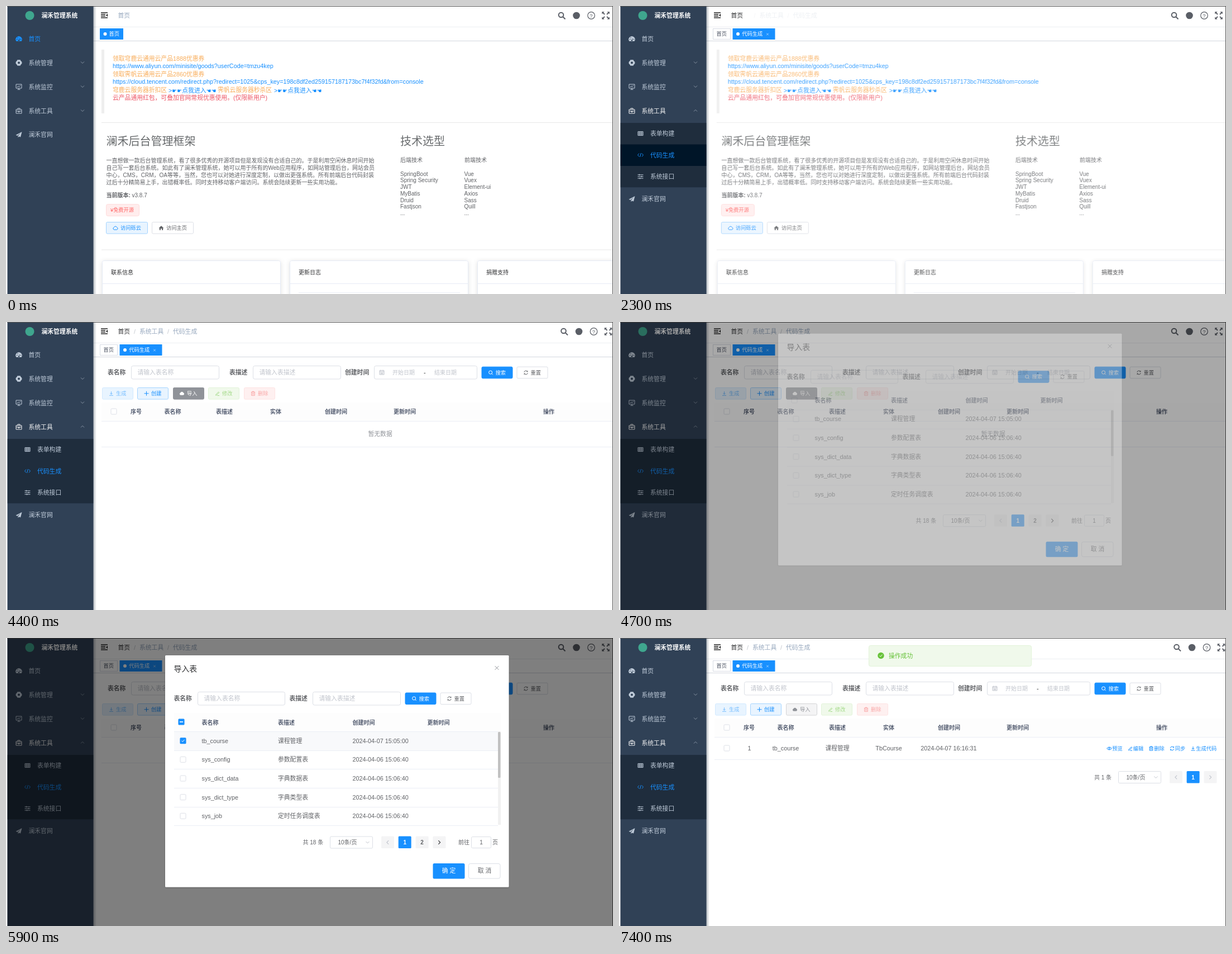
An HTML page for the animation above (8 s loop, 1087x515 px).

```html
<!DOCTYPE html>
<html lang="zh-CN">
<head>
<meta charset="utf-8">
<title>管理系统</title>
<style>
html, body { margin: 0; width: 100%; height: 100%; overflow: hidden; background: #fff; }
svg { display: block; width: 100vw; height: 100vh; }
text { font-family: 'Liberation Sans', 'Noto Sans CJK SC', 'Noto Sans CJK', 'DejaVu Sans', sans-serif; white-space: pre; }
</style>
</head>
<body>
<svg id="stage" viewBox="0 0 1087 515" xmlns="http://www.w3.org/2000/svg"></svg>
<script>
const BLUE = '#1890ff', GREY = '#606266', PALE = '#c0c4cc', LINE = '#dcdfe6', INK = '#303133', HEAD = '#515a6e';
const LOOP = 8000, STEP = 100;
const SIDE = 2.5; // left edge of the sidebar

// ---- drawing helpers (y is the vertical centre of a text) ----
const T = (x, y, s, size = 10.8, fill = GREY, extra = '') =>
  `<text x="${x}" y="${(y + size * 0.37).toFixed(2)}" font-size="${size}" fill="${fill}" ${extra}>${s}</text>`;
const BOLD = 'font-weight="700"', MID = 'text-anchor="middle"';
const R = (x, y, w, h, fill, extra = '') =>
  `<rect x="${x}" y="${y}" width="${w}" height="${h}" fill="${fill}" ${extra}/>`;
const box = (x, y, w, h, fill, stroke, rx = 2, extra = '') =>
  R(x + .5, y + .5, w - 1, h - 1, fill, `stroke="${stroke}" rx="${rx}" ${extra}`);
const H = (x1, x2, y, c = '#ebeef5') => R(x1, y, x2 - x1, 1, c);
const G = (id, body, extra = '') => `<g id="${id}" ${extra}>${body}</g>`;
const icon = (name, x, y, c = 'currentColor', k = 1) =>
  `<path transform="translate(${x} ${y}) scale(${k})" d="${ICONS[name]}" fill="none" stroke="${c}" stroke-width="1"/>`;
const solid = (name, x, y, c = 'currentColor') =>
  `<path transform="translate(${x} ${y})" d="${ICONS[name]}" fill="${c}" fill-rule="evenodd"/>`;

const ICONS = {
  gauge: 'M-4.6 4A5.6 5.6 0 1 1 4.6 4ZM-.9 2.4A1.3 1.3 0 1 0 .9 2.4L1.8-2ZM-4 0h1.4v1.2H-4ZM2.8 0h1.4v1.2H2.8ZM-2.6-2.9h1.2v1.2h-1.2Z',
  gear: 'M-2.6-5.2H2.6L3.4-3.6 5.4-1.4V1.4L3.4 3.6 2.6 5.2H-2.6L-3.4 3.6-5.4 1.4V-1.4L-3.4-3.6ZM-2 0A2 2 0 1 0 2 0A2 2 0 1 0-2 0Z',
  monitor: 'M-5-4.5H5V2.5H-5ZM-2.5 4.8H2.5M0 2.5V4.8M-3 .5L-1-1.5 .5 0 3-2.8',
  bag: 'M-5-2.5H5V4.5H-5ZM-2-2.5V-4.5H2V-2.5M-5 .5H5M-1 .5V2H1V.5',
  plane: 'M5.5-5L-5.5 .8-2.6 2 3-3-1.5 2.6V5.2L.2 3.3 3 4.5Z',
  table: 'M-4.5-3.5H4.5V3.5H-4.5ZM-4.5-1.2H4.5M-4.5 1.2H4.5M-1.5-3.5V3.5M1.5-3.5V3.5',
  code: 'M-2.5-2.8L-5 0-2.5 2.8M2.5-2.8L5 0 2.5 2.8M.9-3.4L-.9 3.4',
  sliders: 'M-5-3.2H5M-5 0H5M-5 3.2H5M-2-4.4V-2M2-1.2V1.2M-1 2V4.4',
  chevron: 'M-3-1.5L0 1.5 3-1.5',
  left: 'M1.5-3L-1.5 0 1.5 3',
  right: 'M-1.5-3L1.5 0-1.5 3',
  search: 'M-3.4-.4A3 3 0 1 0 2.6-.4A3 3 0 1 0-3.4-.4M1.8 1.8L3.8 3.8',
  refresh: 'M-3.2-.8A3.3 3.3 0 0 1 2.8-1.8M3-3.4V-1.6H1.2M3.2 .8A3.3 3.3 0 0 1-2.8 1.8M-3 3.4V1.6H-1.2',
  down: 'M0-3.5V1.5M-2-.5L0 1.5 2-.5M-3.5 3.5H3.5',
  plus: 'M-4 0H4M0-4V4',
  pen: 'M-2.6 1.8L2-2.8 3.2-1.6-1.4 3-3 3.2ZM-.2 3.7H3.6',
  bin: 'M-3.6-2.4H3.6M-1.4-2.4V-3.6H1.4V-2.4M-2.8-2.4V3.6H2.8V-2.4M-.9-.8V2M.9-.8V2',
  eye: 'M-4.4 0Q0-5 4.4 0Q0 5-4.4 0ZM-1.3 0A1.3 1.3 0 1 0 1.3 0A1.3 1.3 0 1 0-1.3 0',
  calendar: 'M-4-3.2H4V4H-4ZM-4-1H4M-2-4.4V-2.2M2-4.4V-2.2M-2.4 1H2.4M-2.4 2.6H2.4',
  cloud: 'M-2.4 3A2.2 2.2 0 0 1-2.6-1.2A2.8 2.8 0 0 1 2.6-1.2A2.2 2.2 0 0 1 2.4 3Z',
  house: 'M-4.5 .2L0-4 4.5 .2H3.2V3.8H1V1H-1V3.8H-3.2V.2Z',
  cross: 'M-3.4-3.4L3.4 3.4M3.4-3.4L-3.4 3.4',
  tick: 'M-2.5 0L-.7 1.9 2.6-1.9',
};

const check = (x, y) => box(x - 5.5, y - 5.5, 11, 11, '#fff', LINE, 1.5);
const field = (x, y, w, hint) => box(x, y, w, 24.5, '#fff', LINE, 3) + T(x + 11.5, y + 12, hint, 10.8, PALE);
const button = (x, y, w, name, label, bg, line, c) =>
  box(x, y, w, 21.6, bg, line) + icon(name, x + 16.5, y + 10.8, c) + T(x + 25, y + 10.8, label, 9.24, c);
const searchPair = (x, y) =>
  button(x, y, 56, 'search', '搜索', BLUE, BLUE, '#fff') +
  button(x + 63, y, 56, 'refresh', '重置', '#fff', LINE, GREY);
const pageBtn = (x, y, body, bg = '#f4f4f5') => R(x, y, 23, 21.6, bg, 'rx="1.5"') + body;
const pageNum = (x, y, n, on) =>
  pageBtn(x, y, T(x + 11.5, y + 11, n, 10, on ? '#fff' : GREY, BOLD + ' ' + MID), on ? BLUE : '#f4f4f5');
const pageArrow = (x, y, name, c) => pageBtn(x, y, icon(name, x + 11.5, y + 11, c, 1.1));
const pager = (x, y, total, w) =>
  T(x, y, total, 10) + box(x + w, y - 11, 77, 22, '#fff', LINE) +
  T(x + w + 14.5, y, '10条/页', 10) + icon('chevron', x + w + 67.5, y, PALE);

// ---- home page ----
function home() {
  const orange = '#f8ac59';
  const link = x => T(x, 151, '>', 10.8, BLUE) + T(x + 6.3, 151, '☛☛', 10, BLUE) +
    T(x + 24.3, 151, '点我进入', 10.8, BLUE) + T(x + 67.6, 151, '☚☚', 10, BLUE);
  const lines = (x, y, gap, list) => list.map((s, i) => T(x, y + i * gap, s, 10)).join('');
  const card = (x, title) => box(x, 455, 320, 90, '#fff', '#e6ebf5', 3, 'filter="url(#soft)"') +
    T(x + 16, 476, title, 10, INK) + H(x, x + 320, 496, '#e6ebf5');
  return R(171, 78, 5, 114, '#eee') +
    T(191, 94, '领取穹鹿云通用云产品1888优惠券', 10.8, orange) +
    T(191, 107, 'https://www.aliyun.com/minisite/goods?userCode=tmzu4kep', 10.8, BLUE) +
    T(191, 121.5, '领取霁帆云通用云产品2860优惠券', 10.8, orange) +
    T(191, 135, 'https://cloud.tencent.com/redirect.php?redirect=1025&amp;cps_key=198c8df2ed259157187173bc7f4f32fd&amp;from=console', 10.8, BLUE) +
    T(191, 150, '穹鹿云服务器折扣区', 10.8, orange) + link(291) +
    T(379, 150, '霁帆云服务器秒杀区', 10.8, orange) + link(480) +
    T(191, 164, '云产品通用红包，可叠加官网常规优惠使用。(仅限新用户)', 10.8, '#ed5565') +
    H(171, 1087, 208, '#e8e8e8') +
    T(179.5, 242, '澜禾后台管理框架', 20, '#676a6c', 'font-weight="300"') +
    T(706, 242, '技术选型', 20, '#676a6c', 'font-weight="300"') +
    lines(179.5, 276.5, 13, [
      '一直想做一款后台管理系统，看了很多优秀的开源项目但是发现没有合适自己的。于是利用空闲休息时间开始',
      '自己写一套后台系统。如此有了澜禾管理系统，她可以用于所有的Web应用程序，如网站管理后台，网站会员',
      '中心，CMS，CRM，OA等等，当然，您也可以对她进行深度定制，以做出更强系统。所有前端后台代码封装',
      '过后十分精简易上手，出错概率低。同时支持移动客户端访问。系统会陆续更新一些实用功能。']) +
    T(179.5, 338, '当前版本:', 10, GREY, BOLD) + T(225.5, 338, 'v3.8.7', 10) +
    box(179, 354, 60, 22, '#ffeded', '#ffdbdb', 3) + T(187, 365, '¥免费开源', 9.24, '#ff6464') +
    box(179, 386, 75, 21.6, '#e8f4ff', '#a3d3ff') + icon('cloud', 196, 397, BLUE) + T(205, 397, '访问砾云', 9.24, BLUE) +
    box(261, 386, 75, 21.6, '#fff', LINE) + solid('house', 278, 397, GREY) + T(287, 397, '访问主页', 9.24) +
    T(706, 275, '后端技术', 10) + T(821, 275, '前端技术', 10) +
    lines(706, 300, 11.75, ['SpringBoot', 'Spring Security', 'JWT', 'MyBatis', 'Druid', 'Fastjson', '...']) +
    lines(820.5, 300, 11.75, ['Vue', 'Vuex', 'Element-ui', 'Axios', 'Sass', 'Quill', '...']) +
    H(171, 1087, 435.5, '#e8e8e8') +
    card(172, '联系信息') + card(508, '更新日志') + card(844, '捐赠支持') + H(524, 813, 512);
}

// ---- generator page ----
function generator() {
  const heads = [[223, '序号'], [283.5, '表名称'], [376, '表描述'], [473, '实体'], [571, '创建时间'], [694, '更新时间'], [962, '操作']];
  const ops = [[878, 'eye', '预览'], [915.5, 'pen', '编辑'], [953, 'bin', '删除'], [990.5, 'refresh', '同步'], [1028, 'down', '生成代码']];
  const importBtn = (bg, line, c) => box(299, 117, 56, 21.6, bg, line) + solid('cloud', 315, 127.8, c) + T(324, 127.8, '导入', 9.24, c);
  return T(182, 90, '表名称', 10.8, GREY, BOLD) + field(224, 78, 158, '请输入表名称') +
    T(400, 90, '表描述', 10.8, GREY, BOLD) + field(442, 78, 158, '请输入表描述') +
    T(607, 90, '创建时间', 10.8, GREY, BOLD) + box(659, 78, 185, 24.5, '#fff', LINE, 3) +
    icon('calendar', 673, 90, PALE) + T(692, 90, '开始日期', 10, PALE) + T(748, 90, '-', 10.8, INK) + T(767, 90, '结束日期', 10, PALE) +
    searchPair(851.5, 79.7) +
    button(172, 117, 56, 'down', '生成', '#e8f4ff', '#d1e9ff', '#74bcff') +
    button(235, 117, 56, 'plus', '创建', '#e8f4ff', '#a3d3ff', BLUE) +
    importBtn('#f4f4f5', '#d3d4d6', '#909399') + G('importHover', importBtn('#909399', '#909399', '#fff')) +
    button(362, 117, 56, 'pen', '修改', '#f0f9eb', '#e1f3d8', '#a4da89') +
    button(426, 117, 56, 'bin', '删除', '#fef0f0', '#fde2e2', '#f9a7a7') +
    R(171, 144, 916, 34, '#fdfdfd') + H(171, 1087, 177) + check(193, 160) +
    heads.map(([x, s]) => T(x, 160.5, s, 10, HEAD, BOLD)).join('') +
    G('empty', T(648.5, 200, '暂无数据', 10.8, '#909399') + H(171, 1087, 223)) +
    G('result', check(193, 197) + T(233.5, 197, '1', 10.8, GREY, MID) +
      T(298.5, 197, 'tb_course', 10.8, GREY, MID) + T(391, 197, '课程管理', 10.8, GREY, MID) +
      T(483, 197, 'TbCourse', 10.8, GREY, MID) + T(590.5, 197, '2024-04-07 16:16:31', 10.8, GREY, MID) +
      ops.map(([x, i, s]) => icon(i, x, 197.5, BLUE) + T(x + 5.3, 197.5, s, 9.24, BLUE)).join('') +
      H(171, 1087, 217) + pager(851, 249, '共 1 条', 43) +
      pageArrow(986, 238, 'left', PALE) + pageNum(1016.6, 238, 1, true) + pageArrow(1047.5, 238, 'right', PALE));
}

// ---- header and tabs ----
function header() {
  const tab = (x, w, on) => box(x, 40, w, 20, on ? BLUE : '#fff', on ? BLUE : '#d8dce5', 0) +
    (on ? `<circle cx="${x + 9.5}" cy="50" r="3" fill="#fff"/>` : '');
  const c = '#5a5e66';
  const lens = `<g fill="none" stroke="${c}" stroke-width="2"><circle cx="994" cy="16" r="4.3"/><path d="M997 19L1001.5 23.5"/></g>`;
  const help = `<circle cx="1048" cy="17" r="6.3" fill="none" stroke="${c}" stroke-width="1.2"/>` + T(1048, 17, '?', 9.5, c, MID);
  const arrow = [0, 90, 180, 270].map(a => `<g transform="translate(1074 17) rotate(${a})" fill="${c}">
    <path d="M2-2L5-5" stroke="${c}" stroke-width="1.8"/><path d="M2.4-6.8H6.8V-2.4Z"/></g>`).join('');
  return R(156, 0, 931, 63, '#fff') + H(156, 1087, 37, '#eceef2') + H(156, 1087, 62, '#d3d7de') +
    `<path d="M170 12H182M170 15H178M170 18H178M170 21H182" stroke="#222" stroke-width="1.4"/><path d="M182 13.8V19.2L179 16.5Z" fill="#222"/>` +
    G('crumbHome', T(200.5, 17, '首页', 10.8, 'currentColor')) +
    G('crumbs', T(229, 17, '/', 10.8, PALE) + T(239, 17, '系统工具', 10.8, '#97a8be') + T(289, 17, '/', 10.8, PALE) + T(299, 17, '代码生成', 10.8, '#97a8be')) +
    G('tools', lens + `<circle cx="1021.5" cy="17" r="6.3" fill="${c}"/>` + help + arrow) +
    G('tabsHome', tab(168, 42, true) + T(184.5, 50, '首页', 9.24, '#fff')) +
    G('tabsGen', tab(168, 32, false) + T(174.5, 50, '首页', 9.24, '#495060') + tab(203.5, 76, true) +
      T(220.3, 50, '代码生成', 9.24, '#fff') + icon('cross', 266, 50.5, '#fff', .55));
}

// ---- sidebar ----
function sidebar() {
  const c = 'currentColor';
  const item = (y, name, label, fill) => (fill ? solid : icon)(name, 23, y) + T(40.5, y, label, 10.8, c);
  const sub = (i, name, label) => {
    const y = 209 + i * 38.5;
    return G('sub' + i, R(SIDE, y, 154, 38.5, '#001528', `id="subHover${i}"`) + icon(name, 38.5, y + 19) + T(56, y + 19, label, 10.8, c));
  };
  return R(156, 0, 6, 515, 'url(#edge)') + R(SIDE, 0, 154, 515, '#304156') +
    `<circle cx="42.5" cy="17" r="8" fill="#3fa68e"/>` + T(63.5, 17, '澜禾管理系统', 10.8, '#fff', BOLD) +
    `<g color="#bfcbd9">` +
    G('menuHome', item(59, 'gauge', '首页', true)) +
    item(101.5, 'gear', '系统管理', true) + icon('chevron', 137, 101, '#8793a3') +
    item(144.5, 'monitor', '系统监控') + icon('chevron', 137, 144, '#8793a3') +
    R(SIDE, 166, 154, 43, '#263445', 'id="toolHover"') +
    G('menuTools', item(187.5, 'bag', '系统工具')) +
    G('toolArrow', icon('chevron', 0, 0, '#8793a3')) +
    `<g clip-path="url(#fold)">` + R(SIDE, 209, 154, 115.5, '#1f2d3d') +
    sub(0, 'table', '表单构建') + sub(1, 'code', '代码生成') + sub(2, 'sliders', '系统接口') + `</g>` +
    G('site', item(230, 'plane', '澜禾官网', true)) + `</g>`;
}

// ---- import dialog ----
function dialog() {
  const rows = [['tb_course', '课程管理', '2024-04-07 15:05:00'], ['sys_config', '参数配置表'], ['sys_dict_data', '字典数据表'],
    ['sys_dict_type', '字典类型表'], ['sys_job', '定时任务调度表']];
  const row = ([name, note, time = '2024-04-06 15:06:40'], i) => {
    const y = 183.7 + i * 33.65;
    return check(317, y) + T(350.5, y, name) + T(487, y, note) + T(620.5, y, time) + H(301, 881, Math.round(y + 17));
  };
  return R(285, 31, 615.5, 414.5, '#fff', 'rx="1.5" filter="url(#tight)"') +
    T(300.5, 55, '导入表', 13.9, INK) + icon('cross', 879, 53.5, '#909399') +
    T(300.5, 108, '表名称', 10.8, GREY, BOLD) + field(343, 96, 157, '请输入表名称') +
    T(507.5, 108, '表描述', 10.8, GREY, BOLD) + field(549, 96, 158, '请输入表描述') + searchPair(714.5, 97.5) +
    R(301, 134, 585, 33, '#fdfdfd') + H(301, 886, 167) + check(314, 150) +
    [[350.5, '表名称'], [487, '表描述'], [620.5, '创建时间'], [754.5, '更新时间']].map(([x, s]) => T(x, 151, s, 10, HEAD, BOLD)).join('') +
    R(301, 168, 580, 33, '#f8f9fb', 'id="rowHover"') + rows.map(row).join('') +
    G('checked', R(308.5, 144.5, 11, 11, BLUE, 'rx="1.5"') + R(311, 149.2, 6, 1.6, '#fff') +
      R(311.5, 178.2, 11, 11, BLUE, 'rx="1.5"') + icon('tick', 317, 183.7, '#fff')) +
    R(881, 167, 5, 167, '#f1f1f1') + R(881, 168, 4.5, 82, '#c1c1c1', 'rx="1.5"') +
    pager(531.5, 365.5, '共 18 条', 48.5) +
    pageArrow(672, 354.5, 'left', PALE) + pageNum(702.7, 354.5, 1, true) + pageNum(733.6, 354.5, 2) + pageArrow(764.5, 354.5, 'right', INK) +
    T(810, 365.5, '前往', 10) + box(833, 355, 36, 21, '#fff', LINE) + T(851, 365.5, '1', 10, GREY, MID) + T(871, 365.5, '页', 10) +
    R(764.5, 403, 57, 27.5, BLUE, 'id="okButton" rx="2.5"') + T(793, 416, '确 定', 10.8, '#fff', MID + ' font-weight="500"') +
    box(828, 403, 57.5, 27.5, '#fff', LINE, 3) + T(857, 416, '取 消', 10.8, GREY, MID);
}

const message = () => box(447, 13, 292, 38, '#f0f9eb', '#e1f3d8', 3) +
  `<circle cx="469" cy="31.5" r="5.7" fill="#67c23a"/>` + icon('tick', 469, 31.5, '#fff') + T(483, 31.5, '操作成功', 10.8, '#67c23a');

const shadow = (id, dy, blur, alpha) =>
  `<filter id="${id}" x="-10%" y="-20%" width="120%" height="140%"><feDropShadow dx="0" dy="${dy}" stdDeviation="${blur}" flood-color="#000" flood-opacity="${alpha}"/></filter>`;

document.getElementById('stage').innerHTML =
  `<defs><linearGradient id="edge"><stop offset="0" stop-color="#001529" stop-opacity=".3"/><stop offset="1" stop-color="#001529" stop-opacity="0"/></linearGradient>` +
  shadow('soft', 1.5, 4, .12) + shadow('tight', .8, 1.1, .3) +
  `<clipPath id="fold"><rect id="foldRect" x="${SIDE}" y="209" width="154" height="0"/></clipPath></defs>` +
  R(0, 0, 1087, 515, '#fff') + G('home', home()) + G('gen', generator()) + header() + sidebar() +
  R(2, 0, 1085, 1, '#555') + R(1086, 0, 1, 515, '#555') +
  R(SIDE, 0, 1085, 515, '#000', 'id="mask"') + G('dialog', dialog()) + G('message', message());

// ---- motion ----
const el = {};
document.querySelectorAll('#stage [id]').forEach(n => el[n.id] = n);
const set = (id, key, v) => el[id].setAttribute(key, v);
const fade = (id, v) => { set(id, 'opacity', v); set(id, 'display', v > 0 ? 'inline' : 'none'); };
const show = (id, on) => fade(id, on ? 1 : 0);
const move = (id, x, y = 0) => set(id, 'transform', `translate(${x} ${y})`);

function bezier(x1, y1, x2, y2) {
  const at = (a, b, u) => 3 * a * u * (1 - u) ** 2 + 3 * b * u * u * (1 - u) + u ** 3;
  return x => {
    let lo = 0, hi = 1;
    for (let i = 0; i < 24; i++) {
      const u = (lo + hi) / 2;
      if (at(x1, x2, u) < x) lo = u; else hi = u;
    }
    return at(y1, y2, lo);
  };
}
const ease = bezier(.25, .1, .25, 1), easeInOut = bezier(.42, 0, .58, 1);
const ramp = (t, start, len, f = ease) => t <= start ? 0 : t >= start + len ? 1 : f((t - start) / len);
const pulse = (t, on, off, len = 300) => ramp(t, on, len) * (1 - ramp(t, off, len));

function draw(t) {
  // sidebar
  const open = ramp(t, 870, 310, easeInOut), routed = t >= 2300;
  set('foldRect', 'height', 115.5 * open);
  move('site', 0, 115 * open);
  set('toolArrow', 'transform', `translate(137 187) rotate(${180 * open})`);
  fade('toolHover', pulse(t, 190, 1210));
  fade('subHover0', pulse(t, 1330, 1640, 200));
  fade('subHover1', pulse(t, 1630, 3170));
  show('subHover2', false);
  set('menuHome', 'color', routed ? '#bfcbd9' : BLUE);
  set('menuTools', 'color', routed ? '#f4f4f5' : '#bfcbd9');
  set('sub1', 'color', routed ? BLUE : '#bfcbd9');

  // route change
  const out = ramp(t, 2230, 500), into = ramp(t, 2730, 500);
  fade('home', 1 - out);
  move('home', 23 * out);
  fade('gen', into);
  move('gen', -23 * (1 - into));
  fade('crumbs', out);
  move('crumbs', 15 * (1 - out));
  set('crumbHome', 'color', routed ? INK : '#97a8be');
  show('tabsHome', !routed);
  show('tabsGen', routed);
  move('tools', t < 2700 || (t >= 4700 && t < 7300) ? 0 : 4.5);

  // dialog
  show('importHover', t >= 4400 && t < 7000);
  const shown = ramp(t, 4635, 300) * (1 - ramp(t, 6980, 300));
  fade('mask', .5 * ramp(t, 4620, 200) * (1 - ramp(t, 6980, 200)));
  fade('dialog', shown);
  move('dialog', 0, -15.4 * (1 - shown));
  fade('rowHover', ramp(t, 5270, 250));
  fade('checked', ramp(t, 5750, 150));
  set('okButton', 'fill', t < 6400 ? BLUE : t >= 6600 && t < 6700 ? '#1682e6' : '#46a6ff');

  // result
  const done = t >= 7200;
  show('empty', !done);
  show('result', done);
  const landed = ramp(t, 7110, 290);
  fade('message', landed);
  move('message', 0, -38 * (1 - landed));
}

const begin = performance.now();
function tick(now) {
  const t = Math.max(0, now - begin) % LOOP;
  draw(Math.floor(t / STEP) * STEP);
  requestAnimationFrame(tick);
}
draw(0);
requestAnimationFrame(tick);
</script>
</body>
</html>
```
